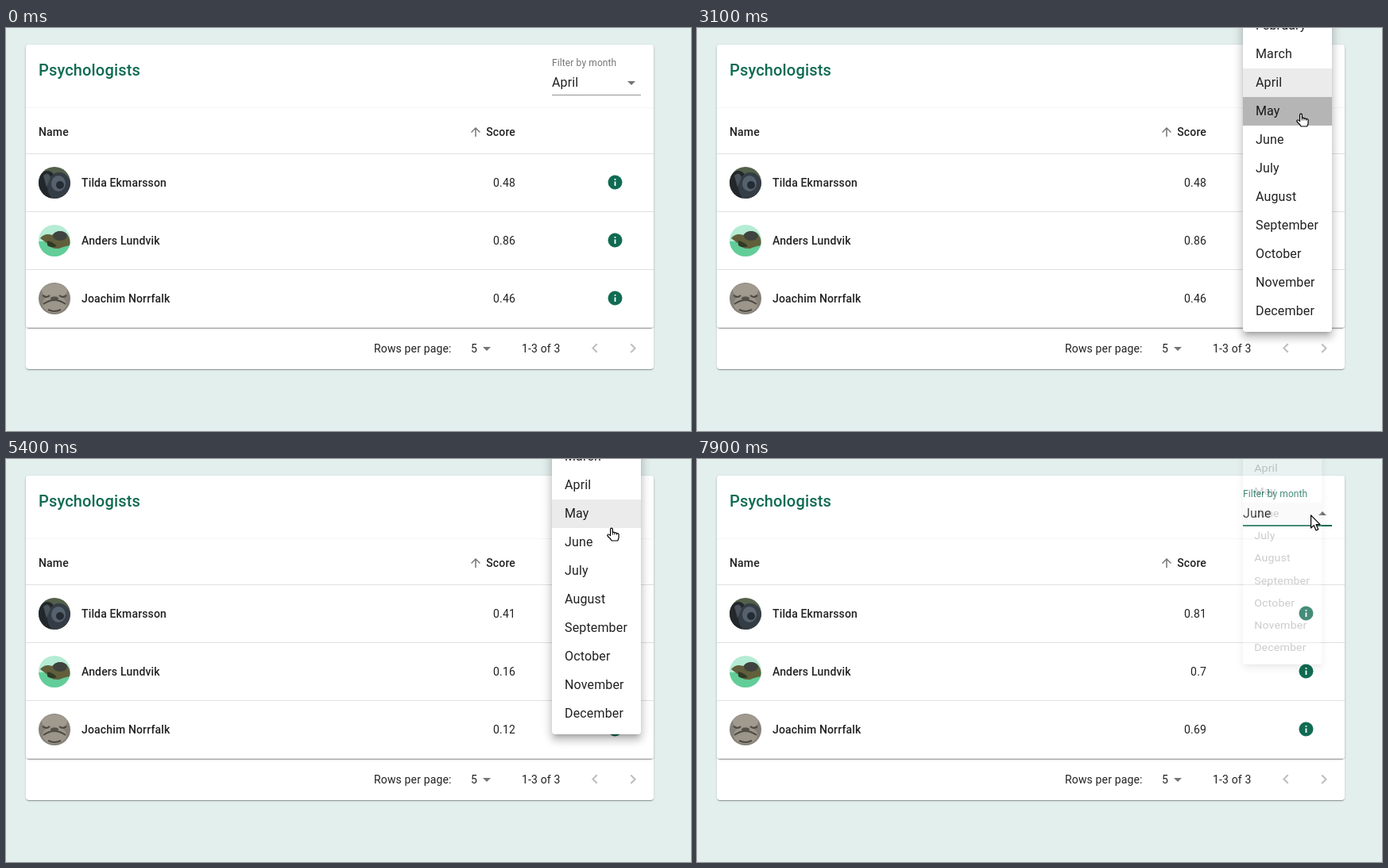
Animation, 862 px wide and 508 px high, one loop 8 s. Source, as an HTML page:

```html
<!DOCTYPE html>
<html lang="en">
<head>
<meta charset="utf-8">
<title>Psychologists</title>
<style>
html, body { margin: 0; width: 100%; height: 100%; overflow: hidden; background: #e3efed; }
#stage { position: absolute; left: 0; top: 0; width: 862px; height: 508px; overflow: hidden;
  font: 14px/24px Roboto, sans-serif; letter-spacing: .01071em; color: rgba(0,0,0,.87); --green: #0f6b52; }
#stage div, #stage span, #stage svg { position: absolute; }
.paper { left: 25px; top: 21px; width: 790px; background: #fff; border-radius: 4px;
  box-shadow: 0 2px 1px -1px rgba(0,0,0,.2), 0 1px 1px rgba(0,0,0,.14), 0 1px 3px rgba(0,0,0,.12); }
.line { left: 25px; width: 790px; height: 1px; background: #e0e0e0; top: calc(var(--y) * 1px); }
.t { left: calc(var(--x) * 1px); top: calc(var(--y) * 1px - 12px); white-space: nowrap; }
.m { font-weight: 500; }
.score { left: auto; right: 221px; }
.title { font-size: 20px; letter-spacing: .0075em; color: var(--green); }
#art { left: 0; top: 0; }
#label { font-size: 12px; letter-spacing: .00938em; color: rgba(0,0,0,.54); }
#field { left: 687px; top: 53px; width: 112px; height: 32px; }
#value { left: 0; top: 6px; font-size: 16px; line-height: 19px; letter-spacing: .00938em; }
#rule, #focus { left: 0; right: 0; bottom: 0; }
#rule { border-bottom: 1px solid rgba(0,0,0,.42); }
#focus { height: 2px; background: var(--green); }
#caret { right: 0; top: 4px; fill: rgba(0,0,0,.54); }
#menu { left: 687px; width: 112px; height: 432px; padding: 8px 0; background: #fff; border-radius: 4px;
  font-size: 16px; letter-spacing: .00938em;
  box-shadow: 0 5px 5px -3px rgba(0,0,0,.2), 0 8px 10px 1px rgba(0,0,0,.14), 0 3px 14px 2px rgba(0,0,0,.12); }
#stage .item { position: relative; box-sizing: border-box; height: 36px; padding: 6px 16px; overflow: hidden; }
#ripple { border-radius: 50%; background: rgba(0,0,0,.87); }
#cursor { left: 0; top: 0; overflow: visible; fill: #fff; stroke: #000; stroke-width: 1.2; stroke-linejoin: round; }
</style>
</head>
<body>
<div id="stage">
  <div class="paper" style="height:409px"></div>
  <div class="paper" style="height:357px"></div>
  <div class="line" style="--y:100;background:#f5f5f5"></div>
  <div class="line" style="--y:158"></div>
  <div class="line" style="--y:231"></div>
  <div class="line" style="--y:304"></div>
  <div class="line" style="--y:377"></div>

  <span class="t m title" style="--x:41;--y:53">Psychologists</span>
  <span class="t m" style="--x:41;--y:131">Name</span>
  <span class="t m score" style="--y:131">Score</span>
  <span class="t m" style="--x:95;--y:195">Tilda Ekmarsson</span>
  <span class="t m" style="--x:95;--y:268">Anders Lundvik</span>
  <span class="t m" style="--x:95;--y:341">Joachim Norrfalk</span>
  <span class="t score value" style="--y:195"></span>
  <span class="t score value" style="--y:268"></span>
  <span class="t score value" style="--y:341"></span>
  <span class="t" style="--x:463;--y:404">Rows per page:</span>
  <span class="t" style="--x:585;--y:404">5</span>
  <span class="t" style="--x:649;--y:404">1-3 of 3</span>

  <svg id="art" width="862" height="508">
    <defs>
      <clipPath id="round"><circle r="20"/></clipPath>
      <g id="info"><circle r="9" fill="#0f6b52"/><path d="M-.9-4.5h1.8v1.8h-1.8zM-.9-.9h1.8v5.4h-1.8z" fill="#fff"/></g>
    </defs>
    <g transform="translate(61 195)"><g clip-path="url(#round)">
      <path d="M-20-20h40v40h-40z" fill="#53604a"/>
      <ellipse cx="-9" cy="3" rx="12" ry="18" fill="#22272c"/>
      <ellipse cx="6" cy="5" rx="15" ry="18" fill="#343c45"/>
      <ellipse cx="5" cy="1" rx="9" ry="10" fill="#56616e"/>
      <ellipse cx="7" cy="3" rx="5" ry="5" fill="#252b33"/>
      <path d="M-14-9q6-6 9 2l-5 13z" fill="#4a525a"/>
    </g></g>
    <g transform="translate(61 268)"><g clip-path="url(#round)">
      <path d="M-20-20h40v40h-40z" fill="#b5ecd4"/>
      <path d="M-20 1h40v19h-40z" fill="#62cd98"/>
      <path d="M-18-3q6-7 15-4q9-9 18-2q6 6 4 15q-9 2-13 4q-11 1-16-7z" fill="#625f3c"/>
      <ellipse cx="7" cy="-6" rx="9" ry="6" fill="#3f433f"/>
      <path d="M-9 0q8 2 12 7q-7 3-12-1z" fill="#2f3b26"/>
    </g></g>
    <g transform="translate(61 341)"><g clip-path="url(#round)">
      <path d="M-20-20h40v40h-40z" fill="#858078"/>
      <ellipse cy="-10" rx="16" ry="9" fill="#a09a8f"/>
      <ellipse cy="7" rx="15" ry="11" fill="#9b958a"/>
      <path d="M-15-4q5 4 9 0M6-4q5 4 9 0M-14 7q14-10 28 0M-8 14q8 4 16 0" fill="none" stroke="#4b4842" stroke-width="2"/>
      <ellipse cy="0" rx="5" ry="2.5" fill="#55514b"/>
    </g></g>
    <use href="#info" x="766.5" y="194.5"/>
    <use href="#info" x="766.5" y="267.5"/>
    <use href="#info" x="766.5" y="340.5"/>
    <path transform="translate(582 122) scale(.75)" d="M4 12l1.41 1.41L11 7.83V20h2V7.83l5.58 5.59L20 12l-8-8-8 8z" fill="#757575"/>
    <path d="M600 402l5 5 5-5z" fill="#757575"/>
    <path transform="translate(729 392)" d="M15.41 16.09l-4.58-4.59 4.58-4.59L14 5.5l-6 6 6 6z" fill="#bdbdbd"/>
    <path transform="translate(777 392)" d="M8.59 16.34l4.58-4.59-4.58-4.59L10 5.75l6 6-6 6z" fill="#bdbdbd"/>
  </svg>

  <span id="label" class="t" style="--x:687;--y:44">Filter by month</span>
  <div id="field">
    <span id="value"></span>
    <svg id="caret" width="24" height="24"><path d="M7 10l5 5 5-5z"/></svg>
    <div id="rule"></div>
    <div id="focus"></div>
  </div>

  <div id="menu"></div>

  <svg id="cursor" width="20" height="24">
    <path id="arrow" d="M.6.8V17l3.7-3.4 2.7 6.3 2.8-1.2-2.7-6.1h5z"/>
    <g id="hand" transform="translate(-5 -.5)">
      <path d="M4.6 10V2.2Q4.6.7 6 .7T7.4 2.2V6q1.7-.9 2.5.5 1.7-.7 2.6.7 2.5-.3 2.6 1.9V12q0 2-1.4 4.5H6.2Q4.7 13.8 1.2 10.7.3 9 1.8 8.5q1.3-.2 2.8 1.5z"/>
      <path d="M7.4 6v3M9.9 6.5V9M12.5 7.2v2" fill="none" stroke-width=".9"/>
    </g>
  </svg>
</div>

<script>
const LOOP = 8000, TICK = 100, ROW = 36, FADE = 347;
const MONTHS = ['January', 'February', 'March', 'April', 'May', 'June', 'July',
  'August', 'September', 'October', 'November', 'December'];
const SCORES = { 3: ['0.48', '0.86', '0.46'], 4: ['0.41', '0.16', '0.12'], 5: ['0.81', '0.7', '0.69'] };
const MENUS = [
  { month: 3, open: 1115, press: 2650, close: 3145 },
  { month: 4, open: 4815, press: 6250, close: 6945 },
  { month: 5, open: 7815, press: Infinity, close: Infinity }
];
// Pointer tip: time, x, y
const PATH = [[200, 846, 80], [400, 801, 79], [600, 801, 79], [700, 801, 78], [800, 801, 78],
  [1000, 757, 66], [1100, 758, 70], [1600, 758, 70], [1900, 759, 108], [3300, 759, 108],
  [3500, 777, 105], [3700, 846, 73], [3900, 846, 73], [4200, 802, 64], [4300, 802, 64],
  [4500, 762, 68], [5200, 761, 68], [5700, 762, 115], [7000, 762, 115], [7400, 772, 70], [8000, 772, 70]];

const $ = id => document.getElementById(id);
const show = (el, on) => { el.style.visibility = on ? 'visible' : 'hidden'; };
const clamp = v => Math.min(1, Math.max(0, v));
const mix = (a, b, k) => a + (b - a) * k;

// cubic-bezier(.4, 0, .2, 1)
function ease(x) {
  x = clamp(x);
  let lo = 0, hi = 1;
  for (let i = 0; i < 20; i++) {
    const s = (lo + hi) / 2, r = 1 - s;
    if (1.2 * r * r * s + .6 * r * s * s + s * s * s < x) lo = s; else hi = s;
  }
  return lo * lo * (3 - 2 * lo);
}

const menu = $('menu');
const items = MONTHS.map(name => {
  const item = document.createElement('div');
  item.className = 'item';
  item.textContent = name;
  menu.append(item);
  return item;
});
const ripple = document.createElement('span');
ripple.id = 'ripple';
const scores = document.querySelectorAll('.value');

function pointerAt(t) {
  const next = Math.max(1, PATH.findIndex(p => p[0] > t));
  const [t0, x0, y0] = PATH[next - 1], [t1, x1, y1] = PATH[next];
  const k = clamp((t - t0) / (t1 - t0));
  return { x: Math.round(mix(x0, x1, k)), y: Math.round(mix(y0, y1, k)) };
}

function drawMenu(t, m, selected, pointer, hovering) {
  const shown = m && t > m.open;
  show(menu, shown);
  if (!shown) return;
  const closing = t > m.close;
  const alpha = closing ? 1 - ease((t - m.close) / FADE) : ease((t - m.open) / FADE);
  const grow = closing
    ? 1 - ease((t - m.close - FADE / 3) / (FADE * .666))
    : ease((t - m.open) / (FADE * .666));
  const scale = mix(.75, 1, grow);
  const top = 43 - ROW * m.month;
  menu.style.top = top + 'px';
  menu.style.transformOrigin = `0 ${69 - top}px`;
  menu.style.transform = scale < 1 ? `scale(${scale}, ${scale * scale})` : 'none';
  menu.style.opacity = alpha;

  const hovered = hovering ? Math.floor((pointer.y - 1 - top - 8) / ROW) : -1;
  items.forEach((item, i) => {
    item.style.background = i === selected ? 'rgba(0,0,0,.08)' : i === hovered ? 'rgba(0,0,0,.045)' : 'none';
  });

  show(ripple, t > m.press);
  if (t > m.press) {
    const picked = m.month + 1, k = ease((t - m.press) / 550);
    const x = 72, y = 28, size = Math.hypot(2 * x + 2, 2 * y + 2);
    if (ripple.parentNode !== items[picked]) items[picked].append(ripple);
    Object.assign(ripple.style, {
      left: x - size / 2 + 'px', top: y - size / 2 + 'px', width: size + 'px', height: size + 'px',
      transform: `scale(${k})`, opacity: mix(.1, .3, k)
    });
  }
}

function render(t) {
  const pointer = pointerAt(t);
  const active = MENUS.find(m => t >= m.open - 20 && t < m.close + FADE);
  const open = !!active && t < active.close;
  const focused = t >= MENUS[0].open - 20;
  const month = 3 + MENUS.filter(m => t > m.close).length;
  const overField = !active && pointer.x >= 687 && pointer.x < 799 && pointer.y >= 53 && pointer.y < 85;
  const overItem = !!active && t > active.open + 200 && t < active.close + 100;

  $('value').textContent = MONTHS[month];
  scores.forEach((el, i) => { el.textContent = SCORES[month][i]; });
  $('label').style.color = focused ? 'var(--green)' : '';
  $('field').style.background = focused && !open ? 'rgba(0,0,0,.05)' : 'none';
  $('caret').style.transform = open ? 'rotate(180deg)' : 'none';
  $('rule').style.borderBottom = overField && !focused ? '2px solid rgba(0,0,0,.87)' : '';
  $('focus').style.transform = `scaleX(${ease((t - MENUS[0].open + 20) / 200)})`;
  drawMenu(t, active, month, pointer, overItem);

  const hand = overField || overItem;
  const visible = t >= 200;
  show($('arrow'), visible && !hand);
  show($('hand'), visible && hand);
  $('cursor').style.transform = `translate(${pointer.x}px, ${pointer.y}px)`;
}

const start = performance.now();
function frame() {
  const t = (performance.now() - start) % LOOP;
  render(Math.floor(t / TICK) * TICK);
  requestAnimationFrame(frame);
}
frame();
</script>
</body>
</html>
```
